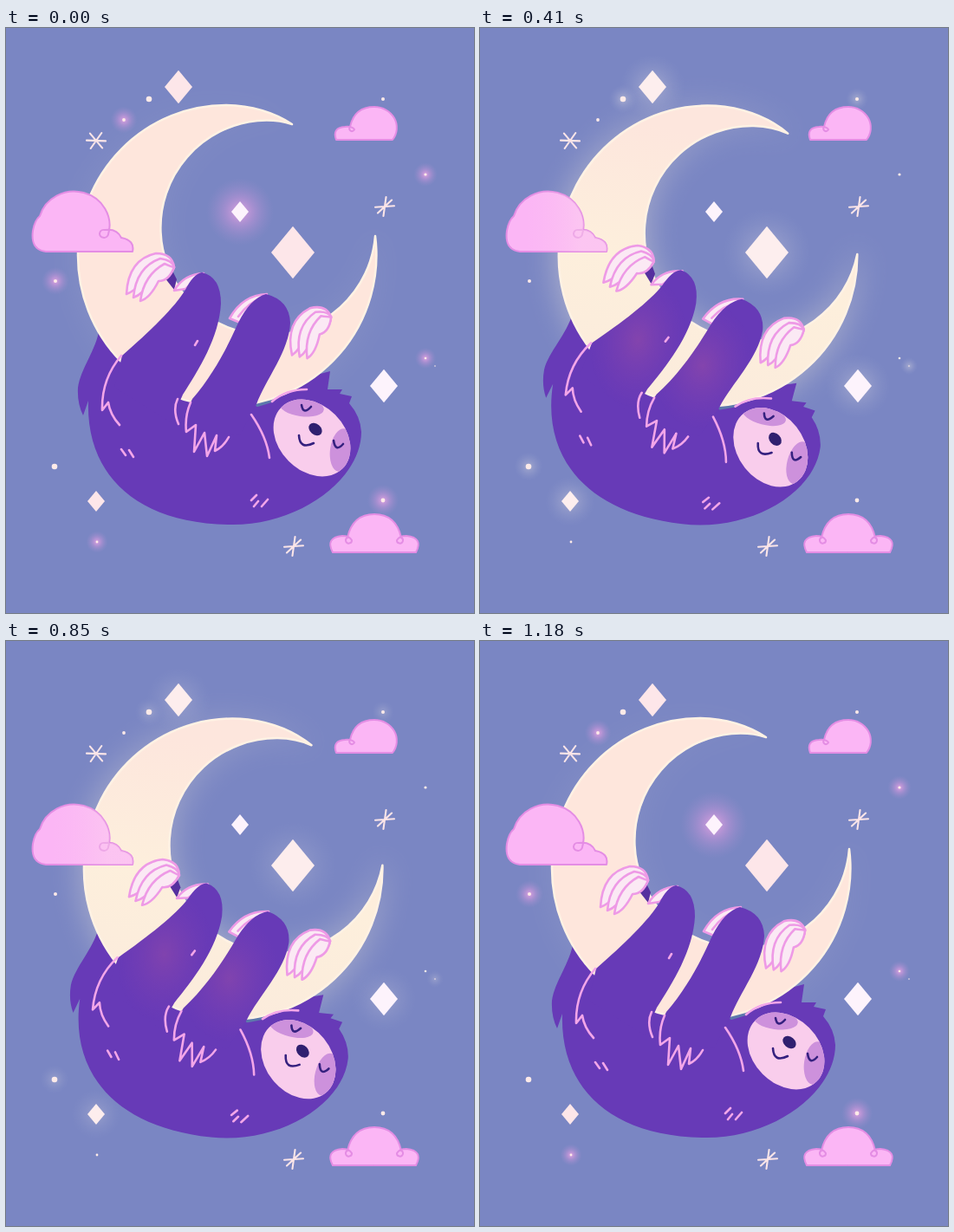
Animation, 540 px wide and 675 px high, one loop 1.26 s. Source, as an HTML page:

```html
<!DOCTYPE html>
<html lang="en">
<head>
<meta charset="utf-8">
<title>Sleepy sloth on a moon</title>
<style>
  html, body { margin: 0; height: 100%; overflow: hidden; background: #7a86c3; }
  svg { display: block; width: 100vw; height: 100vh; }
  path { stroke-linecap: round; stroke-linejoin: round; }
  .line { fill: none; stroke: #f3a6e9; stroke-width: 2.6; }
  .claw { fill: #fbe9f4; stroke: #ee9ae6; stroke-width: 2.6; }
  .cloud { fill: #fbb6f5; stroke: #e48de4; stroke-width: 2; }
  .ink { fill: none; stroke: #35217f; stroke-width: 2.6; }
  .star { fill: none; stroke: #fbe5e8; stroke-width: 2.1; }
  .fur { fill: #673ab7; }
</style>
</head>
<body>
<svg viewBox="0 0 540 675">
  <defs>
    <radialGradient id="violet">
      <stop offset="0" stop-color="#f0a6e6" stop-opacity=".85"/>
      <stop offset=".45" stop-color="#cf97dc" stop-opacity=".45"/>
      <stop offset="1" stop-color="#a58fd0" stop-opacity="0"/>
    </radialGradient>
    <radialGradient id="cream">
      <stop offset="0" stop-color="#fdf6e4" stop-opacity=".75"/>
      <stop offset=".45" stop-color="#dcd8e0" stop-opacity=".4"/>
      <stop offset="1" stop-color="#a9b2d4" stop-opacity="0"/>
    </radialGradient>
    <radialGradient id="warm" r=".45">
      <stop offset="0" stop-color="#b2559e" stop-opacity=".55"/>
      <stop offset="1" stop-color="#9048b0" stop-opacity="0"/>
    </radialGradient>
    <linearGradient id="moonlight" x1=".4" y1="0" x2=".3" y2="1">
      <stop offset=".1" stop-color="#fde6dd"/>
      <stop offset=".55" stop-color="#fdefdc"/>
      <stop offset="1" stop-color="#fbebdc"/>
    </linearGradient>
    <linearGradient id="haze" x1=".65" y1="0" x2=".35" y2=".6">
      <stop offset="0" stop-color="#f6edda" stop-opacity=".15"/>
      <stop offset="1" stop-color="#f6edda"/>
    </linearGradient>
    <linearGradient id="cloudlight">
      <stop offset=".2" stop-color="#fdc4f0" stop-opacity="0"/>
      <stop offset=".75" stop-color="#fdd9ec" stop-opacity=".8"/>
    </linearGradient>
    <filter id="soft" x="-30%" y="-30%" width="160%" height="160%"><feGaussianBlur stdDeviation="16"/></filter>
    <path id="moon" d="M330 111Q298 90 254 89A171 173.5 0 0 0 254 436A174 174 0 0 0 426 240A124 124 0 1 1 290 107Q312 105 330 111Z"/>
    <g id="legs">
      <path d="M134 378C166 350 195 322 207 302Q216 284 226 282Q248 287 248 318C246 357 222 395 204 423L190 455L125 415Z"/>
      <path d="M215 428C240 399 256 367 268 340Q282 312 300 307Q327 314 328 340C327 372 300 405 289 434L270 470L200 460Z"/>
    </g>
    <path id="puff" d="M46 258Q28 256 31 234Q33 222 39 217A40 38 0 0 1 118 238A5 4.5 0 1 1 114 233Q128 231 133 242Q149 245 146 258Z"/>
    <path id="halfcloud" d="M425 605H377Q368 588 388 586Q396 586 399 591A3.5 3.5 0 1 1 394 588Q400 561 425 561"/>
    <g id="hand" class="claw"></g>
    <ellipse id="face" cx="353" cy="473" rx="50" ry="38" transform="rotate(45 353 473)"/>
    <clipPath id="inFace"><use href="#face"/></clipPath>
  </defs>
  <g id="violets" fill="url(#violet)"></g>
  <g id="creams" fill="url(#cream)"></g>
  <g id="swing">
    <use id="halo" href="#moon" fill="url(#haze)" stroke="url(#haze)" stroke-width="12" filter="url(#soft)"/>
    <path class="fur" d="M108 346C104 372 86 393 83 415Q82 433 89 447L95 430C92 515 150 573 262 573C340 573 410 520 410 466Q409 448 396 433L399 425L385 422L388 417L371 417L374 396L340 405L280 425L200 405L150 365Z"/>
    <path fill="none" stroke="#5d78ac" stroke-width="4" d="M204 424L215 428M290 435L306 430"/>
    <use href="#moon" fill="#fee6dc"/>
    <use id="shine" href="#moon" fill="url(#moonlight)"/>
    <use href="#moon" fill="none" stroke="#fff2e4" stroke-width="2.5"/>
    <path fill="#56309f" d="M189 274L197 290L194 302L183 288Z"/>
    <path class="claw" d="M194 303Q205 284 228 283L207 301ZM258 335Q273 308 301 307L270 340ZM268 333Q280 316 296 312"/>
    <use href="#legs" class="fur"/>
    <use id="blush" href="#legs" fill="url(#warm)"/>
    <use href="#hand" transform="translate(148 312)"/>
    <use href="#hand" transform="translate(340 380) rotate(-15)"/>
    <path class="line" d="M133 378Q110 405 111 441L118 432Q120 446 131 458M198 428Q192 440 199 457M213 432Q206 448 208 466L219 458L217 489L229 467L232 494L243 470L241 488Q251 483 257 472M283 446Q301 472 304 496M307 431Q323 417 347 417"/>
    <path id="ticks" class="line"/>
    <use href="#face" fill="#f9cdec"/>
    <g clip-path="url(#inFace)" fill="#cd91dc">
      <ellipse cx="341" cy="437" rx="26" ry="11" transform="rotate(8 341 437)"/>
      <ellipse cx="387" cy="487" rx="13" ry="25" transform="rotate(8 387 487)"/>
    </g>
    <path class="ink" d="M341 435q2 12 11 2M378 476q2 14 11 4M338 470q1 17 17 9"/>
    <ellipse cx="357" cy="463" rx="8.5" ry="6.3" transform="rotate(40 357 463)" fill="#302070"/>
  </g>
  <use href="#puff" class="cloud"/>
  <use id="lit" href="#puff" fill="url(#cloudlight)"/>
  <path class="cloud" d="M381 129Q376 115 391 114Q399 113 402 117A3 3 0 1 1 397 114Q402 91 425 91A26 24 0 0 1 446 129Z"/>
  <g class="cloud">
    <use href="#halfcloud"/>
    <use href="#halfcloud" transform="translate(850) scale(-1 1)"/>
  </g>
  <path id="stars" class="star"/>
  <g id="gems"></g>
  <g id="dots" fill="#fdeae8"></g>
</svg>
<script>
const $ = id => document.getElementById(id);
const LOOP = 1260, STEP = 470 / 13;
const clamp = v => Math.max(0, Math.min(1, v));
const circle = (x, y, r) => `<circle cx="${x}" cy="${y}" r="${r}"/>`;

// Diamond gems and round dots: x, y, half width or radius, pale or violet
const gems = [[199, 68, 16], [331, 259, 25], [104, 546, 10], [436, 413, 16, 'pale'], [270, 212, 10, 'violet']];
const dots = [[165, 82, 3.3], [435, 82, 2], [56, 506, 3.3], [495, 390, .8],
  [136, 106, 1.9, 1], [484, 169, 1.6, 1], [57, 292, 2, 1], [484, 381, 1.3, 1], [435, 545, 2.4, 1], [105, 593, 1.4, 1]];

for (const [x, y, w, kind] of gems) {
  const h = w * 1.21;
  $('gems').innerHTML += `<path class="${kind ? 'pale' : 'rosy'}" fill="#fdf3fc" d="M${x} ${y - h}l${w} ${h}l${-w} ${h}l${-w} ${-h}Z"/>`;
  if (kind == 'violet') $('violets').innerHTML += circle(x, y, w * 3.9);
  else $('creams').innerHTML += circle(x, y, 14 + w * 1.5);
}
for (const [x, y, r, violet] of dots) {
  $('dots').innerHTML += circle(x, y, r);
  $(violet ? 'violets' : 'creams').innerHTML += circle(x, y, violet ? 5 + r * 5.5 : 8 + r * 2.6);
}

// A star is three crossed strokes
const star = (x, y, angles) => angles.map(a => {
  const dx = 11 * Math.cos(a * Math.PI / 180), dy = 11 * Math.sin(a * Math.PI / 180);
  return `M${x - dx} ${y - dy}l${2 * dx} ${2 * dy}`;
}).join('');
$('stars').setAttribute('d', star(104, 130, [2, 50, 125]) +
  star(437, 206, [-4, 98, 137]) + star(332, 598, [-4, 98, 137]));

const tick = (x, y, dx, dy) => `M${x} ${y}l${dx} ${dy}`;
$('ticks').setAttribute('d', tick(133, 486, 5, 7) + tick(142, 487, 5, 8) + tick(218, 366, 3, -5) +
  tick(283, 545, 6, -6) + tick(286, 552, 5, -6) + tick(295, 552, 7, -8));

for (let i = 0; i < 3; i++) {
  const x = 8 * i - 9, y = 4 * i - 5;
  $('hand').innerHTML += `<path d="M${x} ${y}Q${9 * i - 7} ${9 * i - 45} ${5 * i + 25} ${6 * i - 52}` +
    `Q44 ${8 * i - 52} 46 -36Q40 -20 ${9 * i + 10} -20Q${9 * i} ${4 * i - 8} ${x} ${y}Z"/>`;
}

// Stepped linear swing with a rest at each end
function pose(t) {
  if (t < 550) return clamp(Math.floor((t - 80) / STEP) / 13);
  if (t < 710) return 1;
  return clamp(1 - (Math.floor((t - 710) / STEP + .15) + 1) / 13);
}

function draw(now) {
  const p = pose(now % LOOP);
  const fade = (id, v) => $(id).setAttribute('opacity', clamp(v));
  $('swing').setAttribute('transform', `rotate(${9.8 * p} 253 329)`);
  fade('violets', 1 - p / .5);
  fade('creams', (p - .45) / .55);
  fade('halo', .08 + .42 * p);
  fade('shine', p * 1.6);
  fade('blush', p);
  fade('lit', p * .8);
  for (const gem of document.querySelectorAll('.rosy'))
    gem.setAttribute('fill', `rgb(253,${230 + 12 * p},${233 + 7 * p})`);
  requestAnimationFrame(() => draw(performance.now()));
}
draw(0);
</script>
</body>
</html>
```
